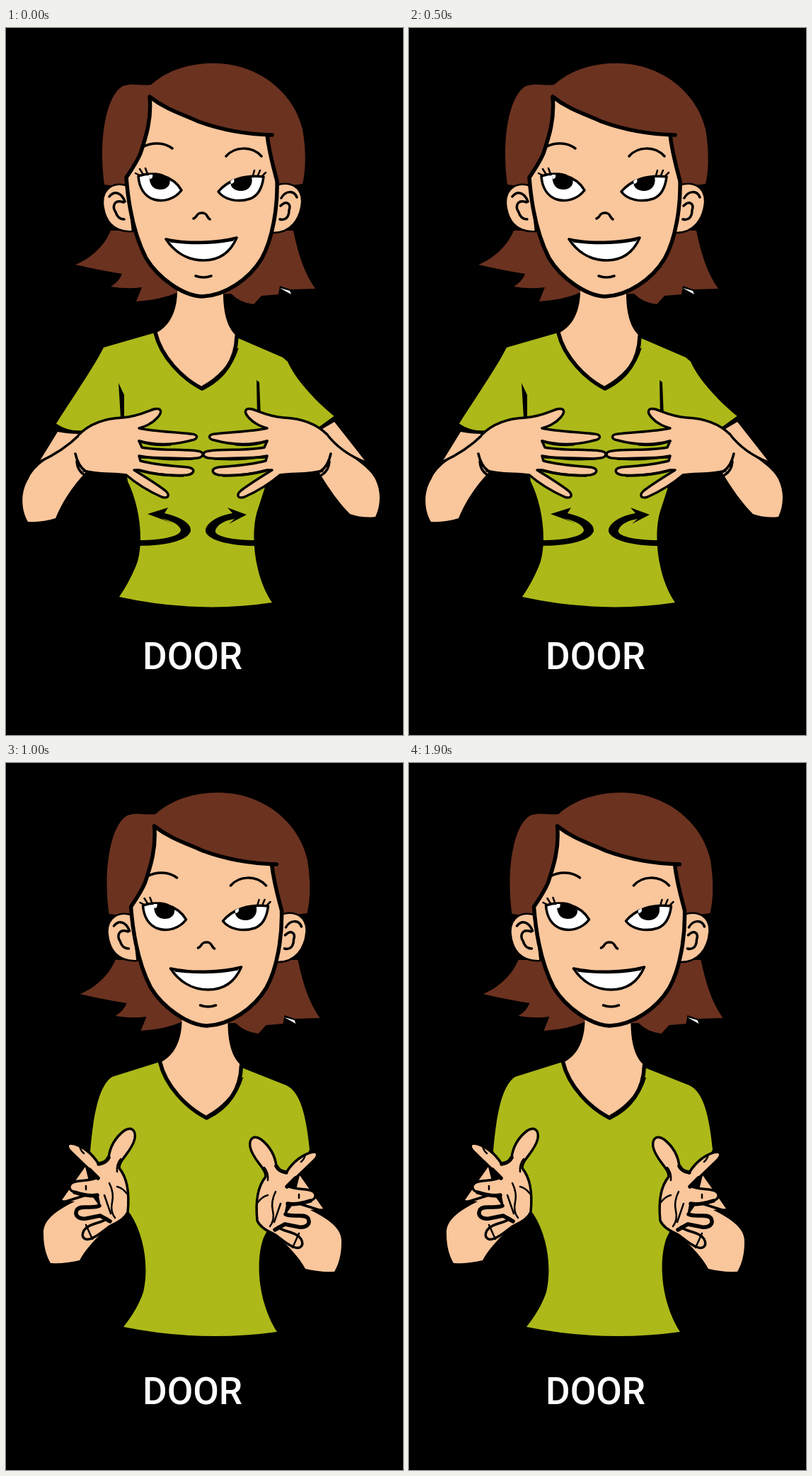
An HTML page that plays this animation: 561x998 px, repeating every 2000 ms.

```html
<!DOCTYPE html>
<html lang="en">
<head>
<meta charset="utf-8">
<title>Door</title>
<style>
html, body { margin: 0; width: 100%; height: 100%; overflow: hidden; background: #000; }
svg { display: block; width: 100%; height: 100%; }
text { font: 500 53px Roboto, sans-serif; fill: #fff; }
.hair { fill: #6b3220; }
.skin { fill: #fac69c; }
.shirt { fill: #adb919; }
.white { fill: #fff; }
.line { fill: none; }
.ink { stroke: #000; stroke-width: 3.5; stroke-linecap: round; stroke-linejoin: round; }
.bold { stroke-width: 5.5; }
.thin { stroke-width: 2.5; }
</style>
</head>
<body>
<svg viewBox="0 0 561 998">
  <rect width="561" height="998"/>
  <defs>
    <g id="handFlat">
      <path class="skin ink" d="M103 574C118 559 139 551 165 550C184 549 198 542 209 538C219 536 222 541 214 550C206 559 197 562 188 565C212 570 238 570 262 573C272 574 272 580 262 582C240 588 214 590 188 583L192 592C216 597 246 594 270 597C280 598 281 605 271 607C246 610 216 609 188 604L190 611C212 617 235 618 257 620C268 622 267 629 256 631C233 633 210 630 188 624L181 624C197 634 212 643 225 653C232 659 230 665 220 662C202 654 184 643 170 631C150 628 130 631 110 625"/>
      <path class="line ink" d="M98 601Q102 619 113 626M100 612Q101 625 111 631M188 583Q208 590 232 588M192 606L262 608M190 625Q216 632 250 632"/>
    </g>
    <g id="armOpen">
      <path class="skin" d="M112 570Q95 594 79 617L125 622Z"/>
      <path class="skin" d="M120 609C84 624 51 640 53 665C53 682 57 696 63 706Q84 707 104 702C112 687 127 670 150 650Z"/>
      <path class="line ink" d="M126 606Q100 614 78 621"/>
      <path class="skin ink" d="M172 634C175 604 171 585 160 572C159 560 178 549 182 530C184 517 176 513 167 519C154 529 147 541 145 557C142 563 138 565 131 566C121 550 106 539 92 537C85 537 86 544 93 550L118 574L129 585C117 592 101 587 93 593C87 598 90 605 99 606C108 609 120 612 129 610L132 625C121 630 105 623 100 631C96 640 104 644 113 643L133 639L143 643C132 651 118 649 110 660C105 670 112 675 121 671C132 667 141 657 148 653C160 648 169 641 172 634Z"/>
      <path class="line ink thin" d="M104 541Q106 548 110 551M113 597V602M146 593Q153 607 150 620T154 642M139 610L148 636M162 559Q156 566 157 577M157 598Q165 600 171 608M113 652L122 672"/>
      <path class="line ink bold" d="M145 557C142 563 138 565 131 566M118 574L130 586M129 610C118 612 106 609 97 606M132 625C121 630 105 623 100 631C96 640 104 644 113 643L133 639L147 647"/>
    </g>
    <g id="head">
      <path class="hair" d="M148 286C139 308 119 326 98 334Q132 342 164 347Q160 358 148 365Q171 369 192 366L184 386Q218 384 243 373L277 376L318 375Q331 388 350 390L361 378L385 376L387 364L402 369L437 368C422 347 413 320 406 286Z"/>
      <path class="white" d="M387 367L401 371L403 376Z"/>
      <path class="skin" d="M242 365C243 395 234 419 213 430C223 466 247 495 277 509C307 495 325 469 326 435C312 423 306 400 307 365Z"/>
      <path class="hair" d="M139 221C131 166 139 97 165 82C179 77 193 82 205 80C231 57 267 48 301 50C359 53 407 92 419 143C424 171 424 199 419 220L380 225L172 225Z"/>
      <path class="skin ink thin" d="M172 223C153 216 136 226 137 248C139 271 151 289 179 287Z"/>
      <path class="skin ink thin" d="M382 222C402 215 419 225 418 246C416 270 402 290 376 289Z"/>
      <path class="line ink" d="M146 238C153 229 163 232 168 245M166 246C152 241 150 253 155 260C157 267 161 270 167 270M389 240C395 229 407 229 411 239M388 251C397 242 403 249 400 257C400 267 395 272 387 270"/>
      <path class="skin" d="M203 97C206 128 198 153 190 177C184 191 176 202 170 211C173 251 181 292 198 325C215 353 250 378 277 379C310 378 344 354 361 326C377 298 384 252 383 216C378 197 372 177 369 151C333 150 302 143 272 132C248 121 226 115 203 97Z"/>
      <path class="line ink bold" d="M203 97C206 128 198 153 190 177C184 191 176 202 170 211C173 251 181 292 198 325C215 353 250 378 277 379C310 378 344 354 361 326C377 298 384 252 383 216C378 197 372 177 369 151M376 151C335 150 302 143 272 132C248 121 226 115 203 97"/>
      <path class="line ink" d="M193 168C206 161 223 161 235 170M311 181C323 167 347 166 361 181M265 269C271 267 268 261 277 261C285 261 283 267 288 270M268 350Q279 354 290 350"/>
      <path class="white ink" d="M187 209C208 202 236 208 248 229C238 242 222 246 209 242C196 238 188 226 187 209Z"/>
      <path class="white ink" d="M300 231C314 214 338 207 364 210C362 226 356 237 345 241C327 247 308 242 300 231Z"/>
      <path d="M203 206Q218 201 231 213C234 222 226 229 217 228C207 228 201 219 203 206ZM317 217Q330 208 347 210C350 222 342 230 332 230C323 230 317 225 317 217Z"/>
      <path class="white" d="M202 207H207Q208 213 203 213ZM317 216L322 213Q324 219 318 220Z"/>
      <path class="line ink thin" d="M183 205L189 208M189 199L194 207M197 198L200 206M351 201L349 208M359 201L356 208M367 204L362 209"/>
      <path class="white ink" d="M226 298C256 305 299 303 326 296C317 317 301 328 279 328C255 328 237 315 226 298Z"/>
      <path class="line ink" d="M233 301Q279 307 320 299"/>
      <path class="line ink bold" d="M211 430C219 464 249 495 277 509C307 495 325 469 326 435"/>
      <path d="M277 511Q316 494 329 451L323 455Q311 486 277 505Z"/>
    </g>
  </defs>

  <g id="closed">
    <path class="shirt" d="M211 430L138 451C121 484 91 526 70 560Q86 570 104 570L160 556L172 640C188 672 195 720 186 753Q177 778 160 803Q270 827 376 811C351 775 345 715 355 682Q365 652 372 628L392 560L443 567L465 549C435 525 408 494 398 471L391 465L326 437L277 509Z"/>
    <use href="#head"/>
    <path d="M159 501L167 518L167 550H162ZM354 497L358 500L360 549H355Z"/>
    <path class="line ink" d="M70 560Q86 571 106 570M440 567L465 549"/>
    <path class="skin" d="M73 570L46 614C70 602 90 587 104 573Q87 573 73 570ZM447 566L464 556Q487 585 508 612C483 603 461 587 444 572Z"/>
    <path class="skin" d="M104 574C80 597 42 612 32 636C20 655 21 680 31 697Q52 698 70 692C79 670 93 648 112 628L125 600ZM452 572C468 596 511 614 522 637C531 656 529 675 522 690Q503 692 486 686C471 671 456 650 443 628L430 600Z"/>
    <path class="line ink" d="M46 613C70 602 90 588 104 574M453 573C466 590 485 604 508 613"/>
    <use href="#handFlat"/>
    <use href="#handFlat" transform="translate(557) scale(-1 1)"/>
    <path d="M188 723C222 723 248 717 247 708C244 700 234 696 219 692L235 699L200 686L229 677L224 685C246 690 262 699 261 710C257 724 225 731 188 731ZM352 723C319 723 293 717 296 709C299 700 310 695 323 693L315 700L340 687L313 677L320 685C297 689 281 700 282 711C286 724 319 731 352 731Z"/>
  </g>

  <g id="open">
    <path class="shirt" d="M217 422L150 443C130 456 123 502 119 548L145 600L176 637C196 668 202 713 194 747Q186 771 166 796Q275 818 383 803C358 765 351 706 364 670L400 600L429 546C424 499 417 465 396 455L333 430L284 501Z"/>
    <use href="#head" transform="translate(6.5 -8)"/>
    <use href="#armOpen"/>
    <use href="#armOpen" transform="translate(527 12) scale(-1 1)"/>
  </g>

  <text x="193" y="905">DOOR</text>
</svg>
<script>
const LOOP = 2000;
const poses = ["closed", "open"].map(id => document.getElementById(id));

function draw(time) {
  const current = Math.floor((time % LOOP) / (LOOP / poses.length));
  poses.forEach((pose, i) => pose.setAttribute("display", i === current ? "inline" : "none"));
}

const start = performance.now();
function tick() {
  draw(performance.now() - start);
  requestAnimationFrame(tick);
}
tick();
</script>
</body>
</html>
```
